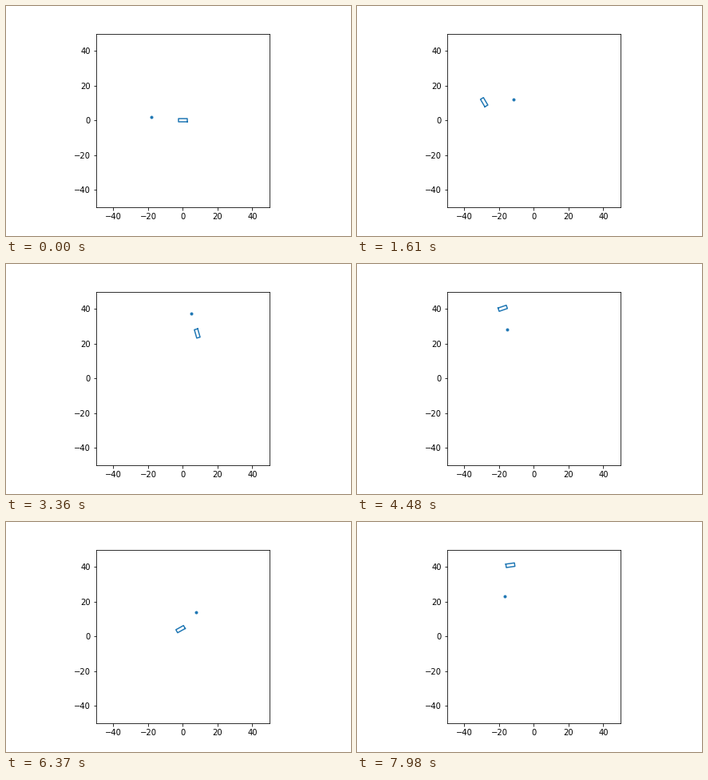
A matplotlib script that plays this animation: 432x288 px, repeating every 8000 ms.

```python
import numpy as np
import matplotlib.pyplot as plt
from matplotlib.animation import FuncAnimation

LOOP_MS = 8000
STEPS = 115
LENGTH, WIDTH = 5, 2

# step, x, y, heading in degrees: backs up past the dot, then keeps turning left
CAR_KEYS = np.array([
    (0, 0, 0, 0), (5, -4.2, 0, 0), (10, -16.6, 1.3, -19),
    (15, -27, 8.4, -50), (20, -29.4, 12, -63), (23, -28.6, 10.5, -59.5),
    (30, -20.8, 2.6, -29), (36, -6.9, 1, 10), (42, 6.3, 10, 58),
    (48, 8.3, 25.9, 106), (54, 0, 37.4, 146), (60, -13, 41.6, 184),
    (64, -17.9, 40.4, 199), (68, -24.8, 36.3, 222), (72, -29.5, 29.8, 247),
    (77, -30.9, 17.6, 283), (84, -20.2, 2.9, 333), (91, -1.3, 4.2, 389),
    (96, 7.2, 13.3, 426), (102, 7.7, 26.5, 468), (108, -1, 38.8, 512),
    (114, -13.5, 41, 548),
])

# step, x, y
DOT_KEYS = np.array([
    (0, -18, 2), (12, -16.3, 5.2), (23, -11.5, 12), (30, -0.8, 14.2),
    (36, 8, 19.8), (42, 9.2, 29.3), (48, 4.9, 37.3), (54, -2.8, 38.8),
    (60, -11.2, 33.5), (64, -15.3, 28.2), (72, -15.6, 15), (77, -11.1, 8.4),
    (84, -1.2, 7.4), (91, 7.6, 13.9), (96, 8.6, 21.5), (102, 3.5, 28.3),
    (108, -7, 29.2), (114, -16.6, 23.1),
])


def smooth(keys, steps):
    """Cubic Hermite curve through the keys, sampled at every step."""
    t, vals = keys[:, 0], keys[:, 1:]
    slope = np.gradient(vals, t, axis=0, edge_order=2)
    i = np.clip(np.searchsorted(t, steps, side="right") - 1, 0, len(t) - 2)
    span = (t[i + 1] - t[i])[:, None]
    u = (steps - t[i])[:, None] / span
    return ((1 + 2 * u) * (1 - u) ** 2 * vals[i]
            + u * (1 - u) ** 2 * span * slope[i]
            + u ** 2 * (3 - 2 * u) * vals[i + 1]
            + u ** 2 * (u - 1) * span * slope[i + 1])


def outline(x, y, heading):
    a = np.radians(heading)
    px = np.array([1, 1, -1, -1, 1]) * LENGTH / 2
    py = np.array([-1, 1, 1, -1, -1]) * WIDTH / 2
    return (x + px * np.cos(a) - py * np.sin(a),
            y + px * np.sin(a) + py * np.cos(a))


steps = np.arange(STEPS)
car_path = smooth(CAR_KEYS, steps)
dot_path = smooth(DOT_KEYS, steps)

fig = plt.figure(figsize=(6, 4), dpi=72, facecolor="white")
fig.subplots_adjust(left=0.125, right=0.9, bottom=0.125, top=0.88)
ax = fig.add_subplot()
ax.set_aspect("equal")
ax.set(xlim=(-50, 50), ylim=(-50, 50))
ax.set_xticks(range(-40, 41, 20))
ax.set_yticks(range(-40, 41, 20))

car, = ax.plot([], [], color="C0", lw=1.5)
dot, = ax.plot([], [], ".", color="C0", ms=6)


def update(n):
    car.set_data(*outline(*car_path[n]))
    dot.set_data(dot_path[n, :1], dot_path[n, 1:])
    return car, dot


anim = FuncAnimation(fig, update, frames=STEPS, interval=LOOP_MS / STEPS,
                     init_func=lambda: update(0), repeat=True, repeat_delay=0)
plt.show()
```
